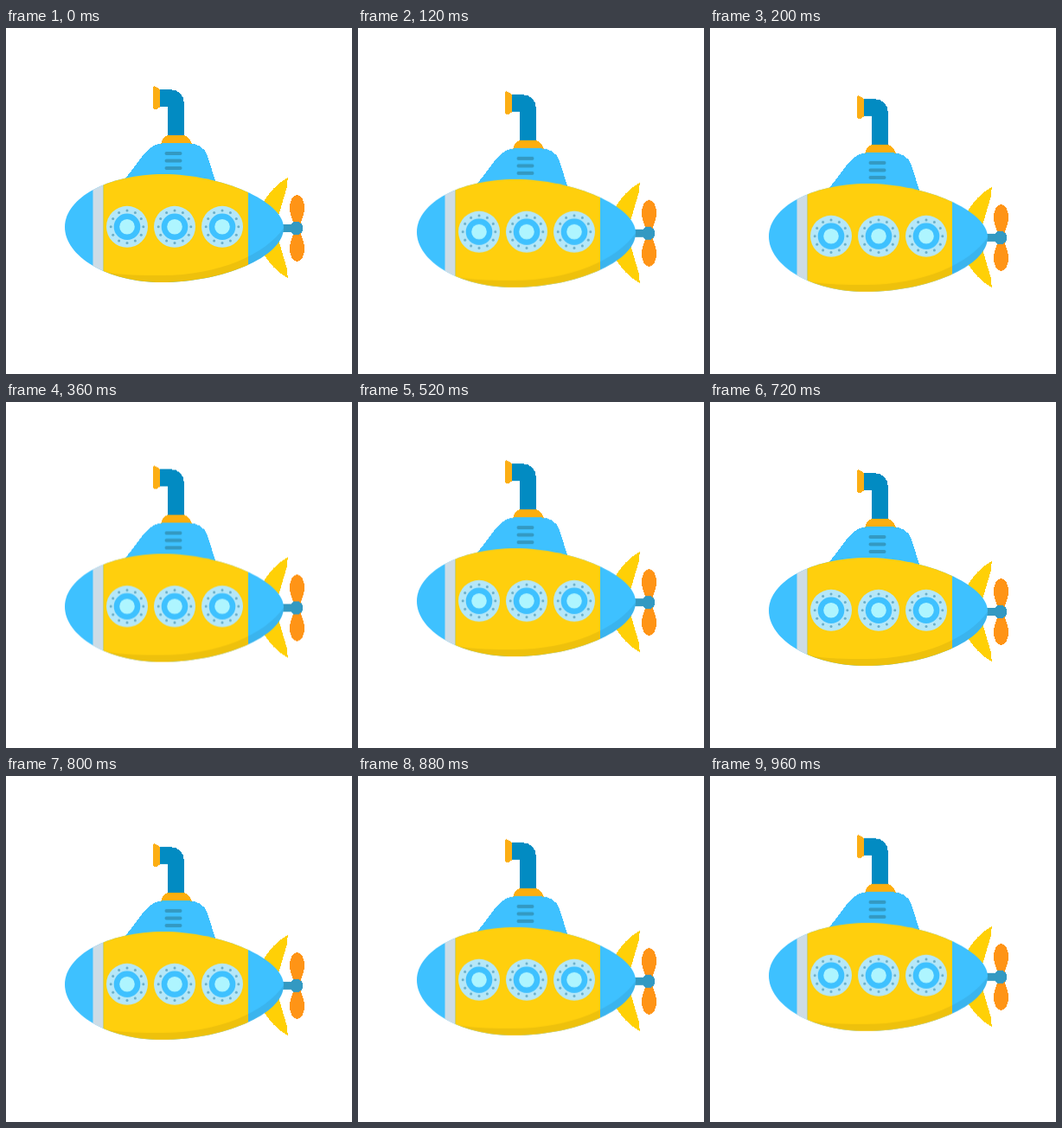
An HTML page that plays this animation: 400x400 px, repeating every 1000 ms.

```html
<!DOCTYPE html>
<html lang="en">
<head>
<meta charset="utf-8">
<title>Bobbing submarine</title>
<style>
  html, body { margin: 0; width: 100%; height: 100%; overflow: hidden; background: #fff; }
  svg { display: block; width: 100vw; height: 100vh; }
  #body { shape-rendering: crispEdges; }
  #hull path { shape-rendering: crispEdges; }
  .smooth { shape-rendering: geometricPrecision; }
</style>
</head>
<body>
<svg viewBox="0 0 400 400">
  <defs>
    <clipPath id="hull">
      <path d="M68 230C68 196 119 169 182 169C248 169 321 200 321 231C321 265 250 294 180 294C117 294 68 264 68 230Z"/>
    </clipPath>
    <path id="fin" d="M325.500 173C313 180 304 190 296 204L315 216L317 211C319 200 325.500 188 325.500 176Z"/>
    <path id="blade" d="M336.500 193C342 193 345 200 345 209C345 216 341 222 340 228H333C332 222 328 216 328 209C328 200 331 193 336.500 193Z"/>
    <g id="port">
      <circle r="24" fill="#b5e7f8"/>
      <circle r="15.3" fill="#3ec1ff"/>
      <circle r="8.8" fill="#aef5ff"/>
    </g>
  </defs>
  <g id="sub">
    <g id="body">
      <!-- tail -->
      <use href="#fin" fill="#ffd006"/>
      <use href="#fin" fill="#ffd006" transform="matrix(1 0 0 -1 0 462)"/>
      <path fill="#3399c2" d="M317 227H332V236H317Z"/>
      <use href="#blade" fill="#ff9416"/>
      <use href="#blade" fill="#ff9416" transform="matrix(1 0 0 -1 0 463)"/>
      <circle cx="335.7" cy="231.5" r="7.8" fill="#3399c2"/>
      <!-- periscope and tower -->
      <path fill="#028bc2" d="M176 71H189C200 71 206 78 206 88V125H187V91H176Z"/>
      <path fill="#fcae14" d="M170 69Q170 67 172.500 67.500L177.500 70.500V91.500L173 94.500Q170 94 170 92Z"/>
      <path fill="#fdae0e" d="M179 134C181 126 186 123.500 191 123.500H202C208 123.500 213 127 215 134Z"/>
      <path fill="#3ec1ff" d="M135 178L159 146.500C167 137 173 133 185 133H208C223 133 230 139 233 148L243 180Z"/>
      <path class="smooth" stroke="#3399c2" stroke-width="4" stroke-linecap="round" d="M185.500 145H201.500M185.500 153.500H201.500M185.500 162H201.500"/>
      <!-- hull -->
      <g clip-path="url(#hull)" class="smooth">
        <path fill="#3ec1ff" d="M60 160H330V300H60Z"/>
        <path fill="#cddce6" d="M100.500 160H112.500V300H100.500Z"/>
        <path fill="#ffcf0d" d="M112.500 160H280V300H112.500Z"/>
        <path opacity=".065" d="M112.500 282C135 286 160 286 180 286C245 286 300 262 321 231V300H112.500Z"/>
      </g>
    </g>
    <g id="ports"></g>
  </g>
</svg>
<script>
  const NS = "http://www.w3.org/2000/svg";
  const ports = document.getElementById("ports");

  function add(parent, name, attrs) {
    const el = document.createElementNS(NS, name);
    for (const key in attrs) el.setAttribute(key, attrs[key]);
    return parent.appendChild(el);
  }

  const RIVETS = 12;
  for (const x of [140, 195, 250]) {
    const g = add(ports, "g", { transform: `translate(${x} 229.8)` });
    add(g, "use", { href: "#port" });
    for (let i = 0; i < RIVETS; i++) {
      const a = i * 2 * Math.PI / RIVETS;
      add(g, "circle", {
        cx: 18.8 * Math.cos(a), cy: 18.8 * Math.sin(a), r: 1.5, fill: "#6aaec8"
      });
    }
  }

  // Two mirrored bobs per loop, held in 40 ms steps
  const LOOP = 1000, STEP = 40, LOW = 240, DEPTH = 11.6;

  function bob(ms) {
    const t = Math.min(ms, LOOP - ms);
    const p = t < LOW ? t / LOW : (LOOP / 2 - t) / (LOOP / 2 - LOW);
    return DEPTH * (1 - Math.cos(Math.PI * p)) / 2;
  }

  const frames = [];
  for (let ms = 0; ms <= LOOP; ms += STEP) {
    frames.push({
      offset: ms / LOOP,
      transform: `translate(0px, ${bob(ms).toFixed(2)}px)`,
      easing: "steps(1, end)"
    });
  }
  document.getElementById("sub").animate(frames, { duration: LOOP, iterations: Infinity });
</script>
</body>
</html>
```
